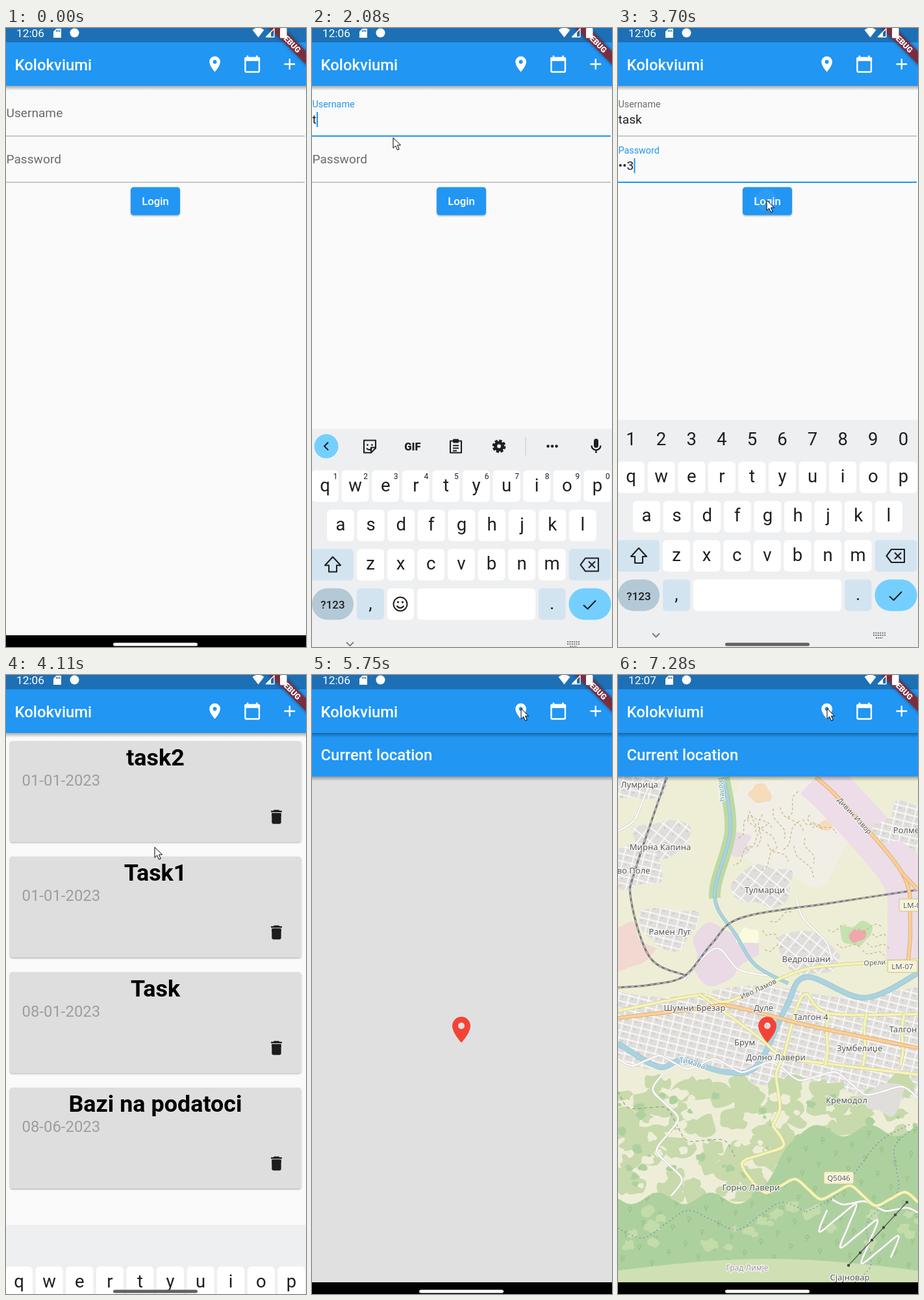
An HTML page that plays this animation: 462 px wide and 951 px high, repeating every 8 s.

```html
<!DOCTYPE html>
<html lang="en">
<head>
<meta charset="utf-8">
<title>Kolokviumi</title>
<style>
html, body { margin: 0; width: 100%; height: 100%; overflow: hidden; background: #fafafa; }
svg { display: block; width: 100%; height: 100%; font-family: Roboto, sans-serif; }
.mid { text-anchor: middle; }
.map text { font-family: "Noto Sans", sans-serif; text-anchor: middle; fill: #555; paint-order: stroke; stroke: #fffc; stroke-width: 2.5px; stroke-linejoin: round; }
</style>
</head>
<body>
<svg id="stage" viewBox="0 0 462 951"></svg>
<script>
const W = 462, H = 951, LOOP = 8000;
const DP = 1.196;                       // stage pixels per layout unit
const BAR = 56 * DP, BAR_TOP = 22, BAR_END = BAR_TOP + BAR, MAP_TOP = BAR_END + BAR, NAV_TOP = 933;
const BLUE = '#2196f3', GREY = '#6b6b6b', INK = '#1f1f1f', TINT = '#d3e4f1', SKY = '#74cfff';

// ---- drawing helpers ----
const rect = (x, y, w, h, fill, rx = 0, more = '') =>
  `<rect x="${x}" y="${y}" width="${w}" height="${h}" fill="${fill}" rx="${rx}" ${more}/>`;
const circle = (x, y, r, fill, more = '') => `<circle cx="${x}" cy="${y}" r="${r}" fill="${fill}" ${more}/>`;
const text = (x, y, size, s, more = '') => `<text x="${x}" y="${y}" font-size="${size}" ${more}>${s}</text>`;
const shape = (d, fill, more = '') => `<path d="${d}" fill="${fill}" ${more}/>`;
const stroke = (d, color, w, more = '') => shape(d, 'none', `stroke="${color}" stroke-width="${w}" stroke-linejoin="round" ${more}`);
const ring = (x, y, r, color, w, more = '') => circle(x, y, r, 'none', `stroke="${color}" stroke-width="${w}" ${more}`);
const group = (id, body, more = '') => `<g id="${id}" ${more}>${body}</g>`;
const range = n => [...Array(n).keys()];
const repeat = (n, fn) => range(n).map(fn).join('');

// icons sit on a 24 unit grid
const ICONS = {
  place: c => shape('M12 22Q5 14 5 9A7 7 0 0 1 19 9Q19 14 12 22ZM9.500 9a2.500 2.500 0 0 0 5 0a2.500 2.500 0 0 0-5 0Z', c, 'fill-rule="evenodd"'),
  day: c => rect(3, 4, 18, 18, 'none', 1, `stroke="${c}" stroke-width="2"`) + rect(2, 3, 20, 5, c, 2) + rect(5, 1, 2, 4, c) + rect(17, 1, 2, 4, c),
  add: c => stroke('M5 12H19M12 5V19', c, 2),
  trash: c => rect(6, 7, 12, 14, c, 2) + rect(6, 7, 12, 4, c) + rect(5, 4, 14, 2, c) + rect(8.5, 3, 7, 2, c),
  mic: c => rect(9, 2, 6, 12, c, 3) + stroke('M6 11a6 6 0 0 0 12 0M12 17V21', c, 2)
};
const icon = (name, x, y, size, color) =>
  `<g transform="translate(${x - size / 2} ${y - size / 2}) scale(${size / 24})">${ICONS[name](color)}</g>`;

let seed = 11;
const rnd = (a = 0, b = 1) => {
  seed = (seed * 16807) % 2147483647;
  return a + (b - a) * seed / 2147483647;
};

// ---- map geometry ----
// smooth line through points written as "x,y x,y"
const curve = s => {
  const p = s.split(' ').map(q => q.split(',').map(Number));
  return p.slice(1).reduce((d, c, i) => {
    const b = p[i], a = p[i - 1] || b, e = p[i + 2] || c;
    const near = b.map((v, k) => v + (c[k] - a[k]) / 6), far = c.map((v, k) => v - (e[k] - b[k]) / 6);
    return `${d}C${near} ${far} ${c}`;
  }, 'M' + p[0]);
};
// points from one place to another, swinging from side to side
const trail = (x1, y1, x2, y2, swing, waves) => {
  const n = waves * 4, len = Math.hypot(x2 - x1, y2 - y1);
  return range(n + 1).map(i => {
    const p = i / n, k = swing * Math.sin(p * waves * 2 * Math.PI) / len;
    return [x1 + (x2 - x1) * p - (y2 - y1) * k, y1 + (y2 - y1) * p + (x2 - x1) * k].map(v => v.toFixed(1)).join();
  }).join(' ');
};
const blob = (x, y, r, fill) => {
  const pts = range(10).map(i => {
    const a = i * Math.PI / 5, k = r * rnd(.6, 1.15);
    return `${(x + k * Math.cos(a)).toFixed(1)},${(y + k * .8 * Math.sin(a)).toFixed(1)}`;
  });
  return shape(curve([...pts, pts[0]].join(' ')), fill);
};
const below = (edge, fill) => shape('M' + range(67).map(i => [i * 7, edge(i * 7).toFixed(1)]).join('L') + `L${W} ${H}L0 ${H}Z`, fill);
const scatter = (n, y1, y2, r, fill) => repeat(n, () => blob(rnd(0, W), rnd(y1, y2), rnd(r / 3, r), fill));
const cityTop = x => 486 + 9 * Math.sin(x / 45);
const cityEnd = x => 590 + x * .14 + 9 * Math.sin(x / 28);
const woodTop = x => 752 - 52 * Math.tanh((x - 245) / 18) + 9 * Math.sin(x / 13);

// ---- map lines ----
const cased = (pts, w, fill, edge) => stroke(curve(pts), edge, w + 1.4) + stroke(curve(pts), fill, w);
const lane = pts => cased(pts, 2.2, '#fff', '#d0cecb');
const yellow = pts => cased(pts, 4, '#f5f4b8', '#cfcc8a');
const orange = pts => cased(pts, 4.5, '#fbcf98', '#d9a262');
const river = (pts, w) => cased(pts, w, '#aad3df', '#93bfcd');
const rail = pts => stroke(curve(pts), '#777', 3) + stroke(curve(pts), '#ddd', 1.2, 'stroke-dasharray="5 5"');
const dashed = (pts, color, gap) => stroke(curve(pts), color, 1.2, `stroke-dasharray="${gap}"`);
const along = (id, pts, name, at, size, more = '') => `<path id="${id}" d="${curve(pts)}" fill="none"/>` +
  `<text font-size="${size}" dy="4" ${more}><textPath href="#${id}" startOffset="${at}%">${name}</textPath></text>`;
const shield = (s, x, y) => rect(x - 23, y - 10, 46, 19, '#f5f2cf', 3, 'stroke="#c9c48e"') + text(x, y + 4, 11.5, s);

const BROOK = '163,157 173,240 149,340 182,400 212,446 262,474';
const RIVER = '462,458 380,496 290,464 258,512 214,600 165,610 100,592 62,602 0,566';
const TRUNK = '305,157 345,195 438,305 450,380 447,440';
const SKUPI = '0,516 125,492 170,501 270,458 330,446 462,438';

const TOWNS = [['Лумрица', 33, 173], ['Мирна Капина', 65, 269], ['во Поле', 24, 305], ['Тулмарци', 226, 335],
  ['Рамен Луг', 80, 399], ['Ведрошани', 290, 441], ['Ролме', 444, 243]];
const QUARTERS = [['Шумни Брезар', 118, 516], ['Дуле', 224, 516], ['Талгон 4', 297, 530], ['Талгон', 439, 549], ['Брум', 195, 569],
  ['Долно Лавери', 243, 592], ['Зумбелиџе', 372, 578], ['Кремодол', 352, 658], ['Горно Лавери', 205, 792], ['Сјајновар', 357, 930]];

const town = ([, x, y], i) => ['#e0dedb', `url(#streets${i % 2})`].map((fill, k) => {
  if (!k) town.seed = seed;
  seed = town.seed;                     // same outline for ground and streets
  return blob(x, y - 10, 50, fill);
}).join('');

const land = () => rect(0, MAP_TOP, W, H, '#eeeed6') +
  blob(275, 240, 115, '#f1eee6') + blob(255, 200, 80, '#f1eee6') +
  stroke(curve(TRUNK), '#ecdde8', 70) + blob(160, 430, 58, '#e9dae6') + blob(185, 260, 22, '#e9dde4') +
  stroke(curve(BROOK), '#bcd9a4', 18, 'stroke-dasharray="190 999"') +
  blob(8, 420, 50, '#f2d8d0') + blob(219, 183, 18, '#f5dcba') + blob(318, 232, 13, '#f5dcba') +
  blob(367, 400, 26, '#c4e2b0') + blob(368, 400, 14, '#f0a7ab') + blob(200, 402, 18, '#fafade') +
  TOWNS.map(town).join('') + below(cityTop, '#e0dedb') + below(cityTop, 'url(#streets0)');

const hills = () => below(cityEnd, '#eeeed8') +
  scatter(150, 625, 800, 26, '#c8d9ac') + scatter(45, 640, 800, 14, '#eeeed8') + scatter(40, 640, 800, 10, '#add19e') +
  blob(410, 650, 34, '#e0dedb') + below(woodTop, '#add19e') + below(woodTop, 'url(#trees)') +
  scatter(30, 815, 880, 13, '#c3dcaa') + below(x => 915 - 18 * Math.sin(x / 147), '#cfe0b4');

const lines = () =>
  repeat(18, () => {
    const x = rnd(200, 300), y = rnd(165, 270);
    return dashed(trail(x, y, x + rnd(-40, 40), y + rnd(15, 50), 4, 1), '#c9b384', '4 3');
  }) +
  repeat(9, () => {
    const x = rnd(190, 400), y = rnd(375, 425);
    return dashed(trail(x, y, x + rnd(20, 45), y + rnd(-15, 15), 4, 1), '#c9b384', '4 3');
  }) +
  river(BROOK, 4) + river(RIVER, 7) +
  dashed(trail(0, 850, 290, 825, 18, 2), '#7280c4', '2 4') + dashed(trail(290, 825, 450, 690, 10, 1), '#7280c4', '2 4') +
  dashed(trail(365, 933, 450, 700, 14, 2), '#7280c4', '2 4') + dashed(trail(0, 640, 180, 740, 14, 2), '#8fa07c', '5 4') +
  lane(trail(70, 612, 82, 800, 18, 2)) + lane(trail(0, 590, 255, 605, 9, 3)) + lane(trail(255, 605, 462, 650, 12, 2)) +
  lane(trail(275, 345, 330, 438, 6, 1)) + lane(trail(0, 240, 72, 157, 8, 1)) + lane('100,470 150,420 185,452 230,462') +
  lane(trail(322, 822, 420, 895, 34, 3)) + lane(trail(330, 806, 462, 826, 5, 2)) +
  rail('75,157 28,295 20,345 50,435 106,462') + rail('0,480 50,476 103,462 145,412 190,373 330,350 462,330') +
  yellow(SKUPI) + yellow('125,490 215,555 255,586 330,598 462,614') + yellow('255,586 285,492 325,520 462,521') +
  repeat(3, i => yellow(trail(325 + i * 58, 520, 319 + i * 58, 600, 2, 1))) +
  yellow(trail(255, 586, 238, 692, 7, 1)) + yellow(trail(238, 692, 208, 780, -26, 1)) + yellow(trail(208, 780, 462, 810, 13, 3)) +
  orange('0,527 130,512 175,509 300,540 462,573') + orange(TRUNK) + orange('438,305 462,330') +
  stroke('M445 810L355 907', '#555', 1.2) + repeat(6, i => circle(445 - i * 18, 810 + i * 19.4, 2.2, '#444'));

const labels = () => [...TOWNS, ...QUARTERS].map(([s, x, y]) => text(x, y, 13, s)).join('') +
  along('trunk', TRUNK, 'Дивин Извор', 25, 11) + along('skupi', SKUPI, 'Иво Ламов', 47, 11) +
  along('skupi2', SKUPI, 'Орели', 86, 10.5) + along('brook', '158,157 168,240', 'Ролец', 25, 11, 'style="fill:#6699b5"') +
  along('river', RIVER.split(' ').reverse().join(' '), 'Тимава', 22, 11.5, 'style="fill:#6699b5"') +
  text(199, 915, 12, 'Град Лимје', 'style="fill:#a08fae"') +
  shield('LM-07', 456, 354) + shield('LM-07', 438, 448) + shield('Q5046', 340, 773);

// map tiles fade in: three early ones, the rest after a short pause
const TILE = 256 * 1.2, FIRST = [9, 1, 10];
const covers = repeat(12, i => rect(95 + (i % 3 - 1) * TILE, 273.5 + (Math.floor(i / 3) - 1) * TILE, TILE, TILE, '#e0e0e0', 0,
  'class="cover" shape-rendering="crispEdges"'));
const tileStart = range(12).map(i => FIRST.includes(i) ? 6740 + 70 * FIRST.indexOf(i) : rnd(6945, 7020));

// ---- screens ----
const PITCH = 71;                       // distance between the two fields
const field = (id, y) => text(0.5, 0, 0, id, `id="${id}Label"`) +
  text(0.5, y + 147, 16 * DP, '', `id="${id}Text" fill="#212121"`) + rect(0, y + 165.5, 460, 1, '#949494', 0, `id="${id}Line"`);
const form = field('Username', 0) + field('Password', PITCH) + rect(0, 129, 2, 23, BLUE, 0, 'id="caret"') +
  rect(192, 244.5, 76, 43, BLUE, 4.5, 'filter="url(#soft)"') + circle(228, 265, 17, '#fff', 'id="press"') +
  text(230, 272, 14 * DP, 'Login', 'class="mid" font-weight="500" fill="#fff"');

const card = (name, date, i) => `<g transform="translate(0 ${i * 177.5})">` +
  rect(6, 101.5, 448.5, 155, '#dedede', 4, 'filter="url(#soft)"') +
  text(230, 138.5, 30 * DP, name, 'class="mid" font-weight="700"') +
  text(24.5, 169.7, 20 * DP, date, 'fill="#9e9e9e"') + icon('trash', 416.5, 218, 24 * DP, '#1c1c1c') + '</g>';
const list = card('task2', '01-01-2023', 0) + card('Task1', '01-01-2023', 1) + card('Task', '08-01-2023', 2) +
  card('Bazi na podatoci', '08-06-2023', 3);

const bar = (y, s) => rect(0, y, W, BAR, BLUE) + rect(0, y + BAR, W, 7, 'url(#shade)') +
  text(13.5, y + 42.5, 20 * DP, s, 'font-weight="500" fill="#fff"');
const mapPage = group('map', land() + hills() + lines() + labels(), 'class="map"') + covers +
  icon('place', 230, 545, 40 * DP, '#f44336') + bar(BAR_END, 'Current location');
const appBar = bar(BAR_TOP, 'Kolokviumi') + circle(321, 55, 0, '#fff', 'id="splash" clip-path="url(#bar)"') +
  ['add', 'day', 'place'].map((name, i) => icon(name, 436.8 - 57.6 * i, 55.5, 24 * DP, '#fff')).join('');

const ribbon = '<g transform="translate(438.200 22.100) rotate(45)">' + rect(-60, -6 * DP, 120, 12 * DP, '#792d3f', 0, 'filter="url(#dim)"') +
  text(0, 4.3, 10.2 * DP, 'DEBUG', 'class="mid" font-weight="900" fill="#fff"') + '</g>';
const status = text(16, 14, 17.3, '12:06', 'id="clock" fill="#fff"') +
  shape('M77.500 1H85V15H73V5.500Z', '#fff') + repeat(3, i => rect(77 + i * 2.5, 3, 1.3, 3, '#1a70b6')) + circle(105.5, 7.5, 7, '#fff') +
  shape('M379.500 3Q388.500-4 397.500 3L388.500 14.500Z', '#fff') + stroke('M400.500 13.700H413V1Z', '#fff', 1.4) +
  shape('M400 14L408 6V14Z', '#fff') + rect(422, 0, 10.5, 15.5, '#fff', 1.5);

// ---- keyboard ----
const STEP = 46.6, ROW = 60.4;
const rowY = r => 666 + r * ROW;
const glyph = (x, y, size, s, more = '') => text(x, y, size, s, `class="mid" fill="${INK}" ${more}`);
const key = (x, r, w, s = '', fill = '#fff', rx = 6) => rect(x, rowY(r), w, 48.5, fill, rx) + glyph(x + w / 2, rowY(r) + 32, 27.5, s);
const keyRow = (s, x, r) => [...s].map((ch, i) => key(x + i * STEP, r, 42, ch)).join('');
const digitRow = (x, y, size) => [...'1234567890'].map((d, i) => glyph(x + i * STEP, y, size, d)).join('');
const dots = (n, x, y, gap, r) => repeat(n, i => circle(x + i * gap, y, r, INK));
const line = d => stroke(d, INK, 2.1);

const toolbar = circle(22, 629, 18.5, SKY) + line('M25 623L19 629L25 635') +
  line('M80 620H98V632L91 639H80ZM98 631H91V639M84 632Q88 637 92 632') + dots(2, 85.5, 627, 7, 1.4) +
  glyph(155, 635, 16.5, 'GIF', 'font-weight="900"') +
  line('M213 621H230V639H213ZM217 628H226M217 632H226M217 636H223') + rect(217, 618, 9, 6, INK, 1) +
  ring(288, 629, 5.5, INK, 5) + ring(288, 629, 8.6, INK, 3.4, 'stroke-dasharray="4.200 2.554"') +
  rect(328.5, 615, 1, 28, '#c4c6c9') + dots(3, 363.5, 629, 6.5, 2.2) + icon('mic', 437.5, 629, 28, INK);
const face = ring(136, 871.5, 10.5, INK, 2) + dots(2, 132.5, 868.5, 7, 1.6) + line('M130.500 874Q136 881 141.500 874');
const keyboard = rect(0, 602, W, 360, '#eeeff1') +
  keyRow('qwertyuiop', -1, 0) + keyRow('asdfghjkl', 23, 1) + keyRow('zxcvbnm', 69, 2) +
  key(-2, 2, 66, '', TINT) + line('M32 799L44 812H38V822H26V812H20Z') +
  key(395.5, 2, 65, '', TINT) + line('M421 801H441V821H421L413.500 811ZM426 806L436 816M436 806L426 816') +
  key(0, 3, 64, '', '#b4c9d6', 24) + glyph(32, 878.5, 17, '?123', 'font-weight="500"') +
  key(69, 3, 42, ',', TINT) + key(349, 3, 41.5, '.', TINT) + key(395.5, 3, 65, '', SKY, 24) + line('M418 873L424.500 879L437 866') +
  group('plain', toolbar + key(116, 3, 41) + face + key(162, 3, 182) + digitRow(36, 679, 12)) +
  group('secret', key(116, 3, 228) + group('numbers', digitRow(20, 640.5, 27.5))) +
  stroke('M53 930L58.500 935.500L64 930', '#777', 1.8) +
  stroke('M393 929.500H412M393 933H412M397 937H408', '#777', 2, 'stroke-dasharray="2 1.400"');

const streets = i => `<pattern id="streets${i}" width="15" height="${11 + i * 6}" patternUnits="userSpaceOnUse" patternTransform="rotate(${14 + 24 * i})">` +
  rect(5, 4, 3, 2, '#d0c8c3') + stroke('M0 1H15M1 0V20', '#fff', 1.4) + '</pattern>';
const defs = `<defs>
  <linearGradient id="shade" x2="0" y2="1"><stop stop-opacity=".32"/><stop offset="1" stop-opacity="0"/></linearGradient>
  <filter id="soft" x="-10%" y="-10%" width="120%" height="125%"><feDropShadow dx="0" dy="1.2" stdDeviation="1" flood-opacity=".32"/></filter>
  <filter id="dim" x="-10%" y="-80%" width="120%" height="260%"><feDropShadow dx="0" dy="0" stdDeviation="2.5" flood-opacity=".5"/></filter>
  <clipPath id="bar">${rect(0, BAR_TOP, W, BAR, '#000')}</clipPath>
  ${streets(0) + streets(1)}
  <pattern id="trees" width="46" height="38" patternUnits="userSpaceOnUse" patternTransform="rotate(9)">
    ${repeat(2, i => ring(9 + i * 23, 9 + i * 17, 2.6, '#8fba80', 1) + rect(8.5 + i * 23, 12 + i * 17, 1, 4, '#8fba80'))}</pattern>
</defs>`;

const pill = (color, more = '') => rect(165, 944.5, 130, 5, color, 2.5, more);
const stage = document.getElementById('stage');
stage.innerHTML = defs + rect(0, 0, W, H, '#fafafa') + group('form', form) + group('list', list) + group('mapPage', mapPage) +
  appBar + rect(0, 0, W, BAR_TOP, '#1d70b5') + rect(0, NAV_TOP, W, 18, '#000') + pill('#fff') + group('keys', keyboard) +
  ribbon + status + pill('#616161', 'id="pill"') +
  group('cursor', shape('M.5.500V16.500L4.200 13L7 19.300L9.700 18.200L7 12H12Z', '#fff', 'stroke="#000" stroke-width="1"'));

// ---- motion ----
const $ = id => document.getElementById(id);
const set = (id, attrs) => { for (const k in attrs) $(id).setAttribute(k, attrs[k]); };
const show = (id, on) => { $(id).style.display = on ? '' : 'none'; };
const part = (t, from, to) => Math.min(1, Math.max(0, (t - from) / (to - from)));
const easeOut = p => 1 - (1 - p) ** 2;
const coverEls = document.querySelectorAll('.cover');

const FOCUS = 1150, NEXT = 2870, LOGIN = 3970, OPEN_MAP = 5750;
const moves = [
  { from: 170, to: 890, x: 124.5, y: 168 },
  { from: 2680, to: 2850, x: 140, y: 212 },
  { from: 3270, to: 3640, x: 228.5, y: 264 },
  { from: 4710, to: 5060, x: 321.5, y: 51 }
];
const pointer = t => moves.reduce((at, m) => {
  const p = easeOut(part(t, m.from, m.to));
  return { x: at.x + (m.x - at.x) * p, y: at.y + (m.y - at.y) * p };
}, { x: 424, y: 935 });
// letters typed at an even pace
const typed = (t, from, pace, max) => Math.min(max, Math.max(0, Math.floor((t - from) / pace) + 1));

function drawField(id, y, t, focusAt, blurAt) {
  const p = easeOut(part(t, focusAt - 20, focusAt + 80)), on = t >= focusAt && t < blurAt;
  set(id + 'Label', { y: y + 137 - 15.5 * p, 'font-size': 16 * DP * (1 - p / 4), fill: on ? BLUE : GREY });
  set(id + 'Line', { height: on ? 2 : 1, y: y + (on ? 165 : 165.5), fill: on ? BLUE : '#949494' });
}

function draw(t) {
  const second = t >= NEXT;
  show('form', t < LOGIN);
  show('list', t >= LOGIN && t < OPEN_MAP);
  show('mapPage', t >= OPEN_MAP);

  drawField('Username', 0, t, FOCUS, NEXT);
  drawField('Password', PITCH, t, NEXT, LOOP);
  const n = typed(t, 2990, 140, 3);
  $('UsernameText').textContent = 'task'.slice(0, typed(t, 2040, 155, 4));
  $('PasswordText').textContent = n ? '•'.repeat(n - 1) + n : '';
  show('caret', (t >= 1200 && t < 1490) || t >= 1820);
  if (t < LOGIN) {
    const w = $(second ? 'PasswordText' : 'UsernameText').getComputedTextLength();
    set('caret', { x: w + 0.8, y: 129 + (second ? PITCH : 0) });
  }
  set('press', { opacity: 0.06 * part(t, 3600, 3690), r: 17 * part(t, 3560, 3700) });

  const drop = 349 * (t < LOGIN ? 1 - easeOut(part(t, 1800, 2150)) : easeOut(part(t, 3990, 4260)));
  show('keys', drop < 349);
  set('keys', { transform: `translate(0 ${drop})` });
  show('plain', t < 2930);
  show('secret', t >= 2930);
  show('numbers', t < LOGIN);
  set('pill', { opacity: part(t, 3400, 3650) - part(t, 4500, 4760) });

  set('splash', { r: 42 * easeOut(part(t, 5080, 5300)), opacity: 0.2 * (1 - part(t, 5250, 5480)) });
  $('clock').textContent = t < 5950 ? '12:06' : '12:07';

  const load = t < 7080 ? Math.min(t, 6940) : t - 140;
  coverEls.forEach((el, i) => el.setAttribute('opacity', 1 - part(load, tileStart[i], tileStart[i] + 120)));

  const { x, y } = pointer(t);
  show('cursor', t >= 170);
  set('cursor', { transform: `translate(${x} ${y})` });
}

const start = performance.now();
function tick() {
  draw((performance.now() - start) % LOOP);
  requestAnimationFrame(tick);
}
tick();
</script>
</body>
</html>
```
